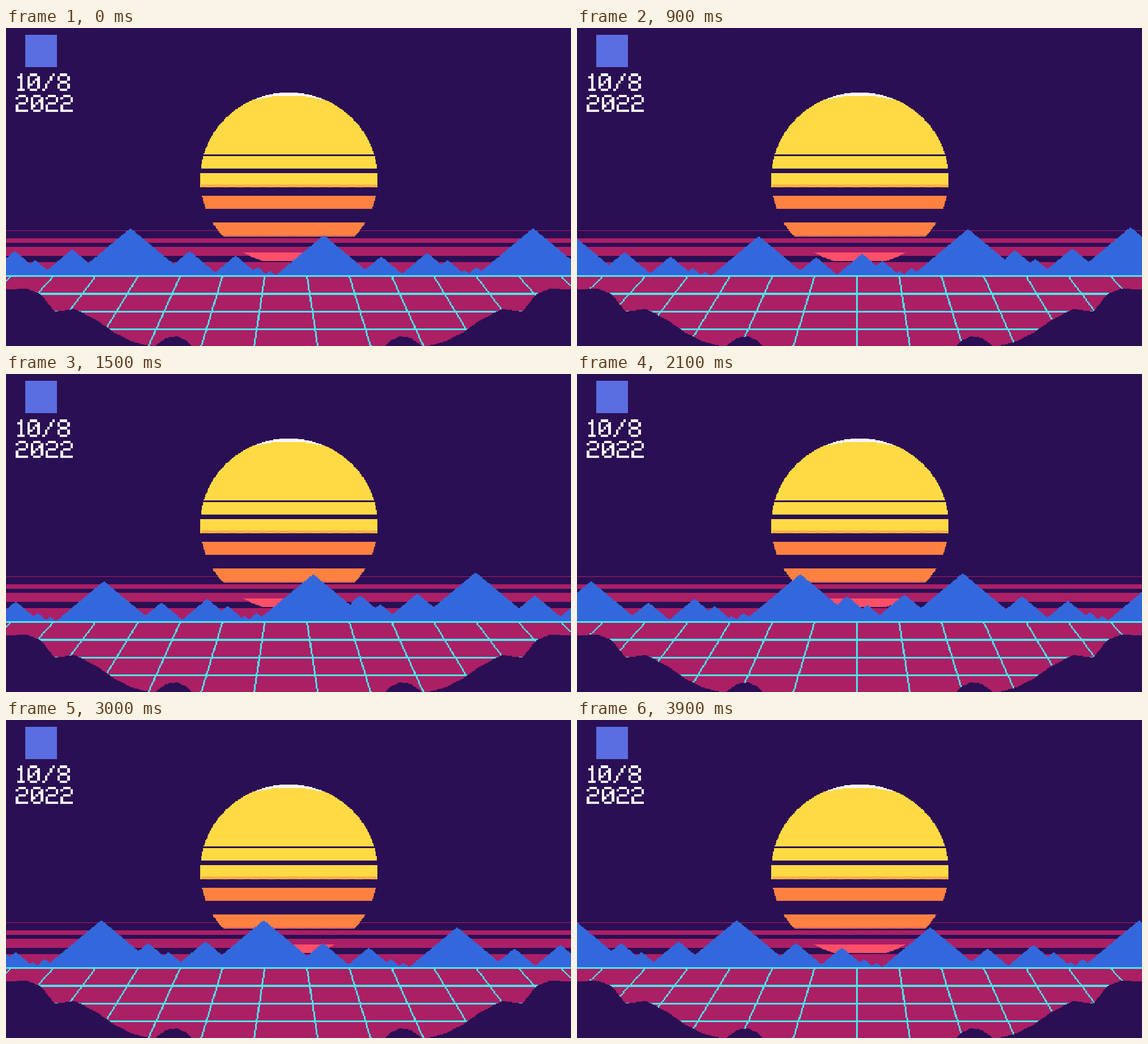
Recreate the animation shown at these times as an HTML page. Size 998x561 px, loop 4.2 s.

```html
<!DOCTYPE html>
<html lang="en">
<head>
<meta charset="utf-8">
<title>Retro sunset</title>
<style>
html, body { margin: 0; width: 100%; height: 100%; overflow: hidden; background: #2b0f54; }
svg { display: block; width: 998px; height: 561px; }
</style>
</head>
<body>
<svg id="scene" viewBox="0 0 640 360" preserveAspectRatio="none" shape-rendering="crispEdges" role="img" aria-label="10/8 2022"></svg>
<script>
// The scene is pixel art on a 640 x 360 grid
const W = 640, H = 360, HORIZON = 280;
const NIGHT = '#2b0f54', MAGENTA = '#ab1f65', CYAN = '#49e7ec', BLUE = '#3368dc';
const YELLOW = '#ffda45', ORANGE = '#ff8142', PINK = '#ff4f69', WHITE = '#fff7f8';
const scene = document.getElementById('scene');

function shape(d, fill, transform = '') {
  const el = document.createElementNS('http://www.w3.org/2000/svg', 'path');
  el.setAttribute('d', d);
  el.setAttribute('fill', fill);
  el.setAttribute('transform', transform);
  return scene.appendChild(el);
}
const box = (x, y, w, h) => `M${x} ${y}h${w}v${h}h${-w}z`;

// Straight line through key points
function lerpKeys(keys, x) {
  let i = 1;
  while (i < keys.length - 1 && keys[i][0] < x) i++;
  const [x0, y0] = keys[i - 1], [x1, y1] = keys[i];
  return y0 + (y1 - y0) * (x - x0) / (x1 - x0);
}

// Filled area below a height function, one column per pixel
function terrain(height, width, base) {
  let d = `M0 ${base}`;
  for (let x = 0; x < width; x++) d += `V${Math.round(height(x + 0.5))}h1`;
  return d + `V${base}z`;
}

// Sky and horizon stripes
shape(box(0, 0, W, H), NIGHT);
for (const [top, bottom] of [[229, 230], [238, 243], [248, 258], [265, H]]) {
  shape(box(0, top, W, bottom - top), MAGENTA);
}

// Sun
const SUN_X = 320.5;
const sunHalf = y => 100.5 * Math.sqrt(Math.max(0, 1 - ((y + 0.5 - 170.5) / 97.5) ** 2));
function sunBand(top, bottom, fill, half = sunHalf) {
  let d = '';
  for (let y = top; y < bottom; y++) {
    const left = Math.round(SUN_X - half(y));
    d += box(left, y, 2 * (SUN_X - left), 1);
  }
  shape(d, fill);
}
function checker(top, bottom, fill) {
  let d = '';
  for (let y = top; y < bottom; y++) {
    const half = Math.floor(sunHalf(y));
    for (let x = 321 - half; x < 320 + half; x++) if ((x + y) % 2) d += box(x, y, 1, 1);
  }
  shape(d, fill);
}
sunBand(73, 81, WHITE);
sunBand(77, 81, YELLOW, y => sunHalf(y) - (81 - y) * 2.7);
sunBand(81, 143, YELLOW);
sunBand(145, 159, YELLOW);
sunBand(164, 180, YELLOW);
sunBand(190, 205, ORANGE);
sunBand(220, 236, ORANGE);
sunBand(254, 264, PINK);
checker(177, 180, ORANGE);
checker(234, 236, PINK);

// Mountains: equal slopes around each peak, in a tile as wide as the stage
const PEAKS = [
  [10, 253], [33, 263], [75, 251], [141, 227], [208, 253], [260, 258], [285, 271], [299, 275],
  [360, 235], [425, 259], [477, 255], [500, 263], [519, 274], [533, 271], [597, 227]
];
function ridge(x) {
  return Math.min(HORIZON, ...PEAKS.map(([px, py]) => {
    const dx = Math.abs(x - px);
    return py + 0.83 * (Math.min(dx, W - dx) - 0.5);
  }));
}
const ridgePath = terrain(ridge, W, HORIZON + 2);
const near = shape(ridgePath, BLUE), far = shape(ridgePath, BLUE);

// Floor grid: even spacing, each line leaning more than the one before
shape(box(0, HORIZON, W, H - HORIZON), MAGENTA);
function gridLines(phase) {
  let d = '';
  for (let i = -7; i < 8; i++) {
    const top = 317.1 + 47.8 * (i + phase / 2);
    const lean = 12 * (i + phase - (i < 0 ? 1 : 0));
    for (let y = HORIZON; y < H; y++) {
      d += box(Math.round(top + lean * (y - HORIZON) / 79) - 1, y, 2, 1);
    }
  }
  return shape(d, CYAN);
}
const grids = [gridLines(1), gridLines(0)];
for (let y = HORIZON; y < H; y += 20) shape(box(0, y, W, 2), CYAN);

// Dark hills in front, mirrored left and right
const HILL = [
  [0, 296], [24, 295], [40, 302], [55, 321], [78, 318], [103, 331], [123, 345],
  [143, 355], [162, 360], [169, 360], [181, 351], [194, 349], [205, 354], [211, 361]
];
const hillPath = terrain(x => lerpKeys(HILL, x), 211, H + 2);
shape(hillPath, NIGHT);
shape(hillPath, NIGHT, `translate(${W} 0) scale(-1 1)`);

// Emblem and date
shape(box(22, 8, 36, 36), '#5b6ee1');
const GLYPHS = {
  0: '.###. #...# #..## #.#.# ##..# #...# .###.',
  1: '.#. ##. .#. .#. .#. .#. ###',
  2: '.###. #...# ....# .###. #.... #.... #####',
  8: '.###. #...# #...# .###. #...# #...# .###.',
  '/': '....# ...#. ...#. ..#.. .#... .#... #....'
};
function write(text, x, y) {
  let d = '', col = 0;
  for (const ch of text) {
    const rows = GLYPHS[ch].split(' ');
    rows.forEach((row, r) => [...row].forEach((dot, c) => {
      if (dot === '#') d += box(col + c, r, 1, 1);
    }));
    col += rows[0].length + 1;
  }
  shape(d, WHITE, `translate(${x} ${y}) scale(2.82)`);
}
write('10/8', 13, 51.5);
write('2022', 11, 75.5);

// Held steps: ridge every 300 ms, grid every 700 ms
const LOOP = 4200;
const TRAVEL = [[0, 0], [2, 106], [4, 202], [7, 344], [11, 537], [13, 600], [14, W]];
const bob = (step, size) => Math.round(size * Math.max(0, Math.sin(Math.PI * step / 6)));

function render(ms) {
  const t = ms % LOOP, step = Math.floor(t / 300);
  const x = -Math.round(lerpKeys(TRAVEL, step));
  const sink = step < 6 ? bob(step, 1) : 0;
  const rise = step > 2 && step < 8 ? bob(step - 2, 1.6) : 0;
  near.setAttribute('transform', `translate(${x} ${sink})`);
  far.setAttribute('transform', `translate(${x + W} ${-rise})`);
  const shown = Math.floor(t / 700) % 2;
  grids.forEach((g, i) => g.setAttribute('display', i === shown ? 'inline' : 'none'));
}

const start = performance.now();
function tick() {
  render(performance.now() - start);
  requestAnimationFrame(tick);
}
tick();
</script>
</body>
</html>
```
